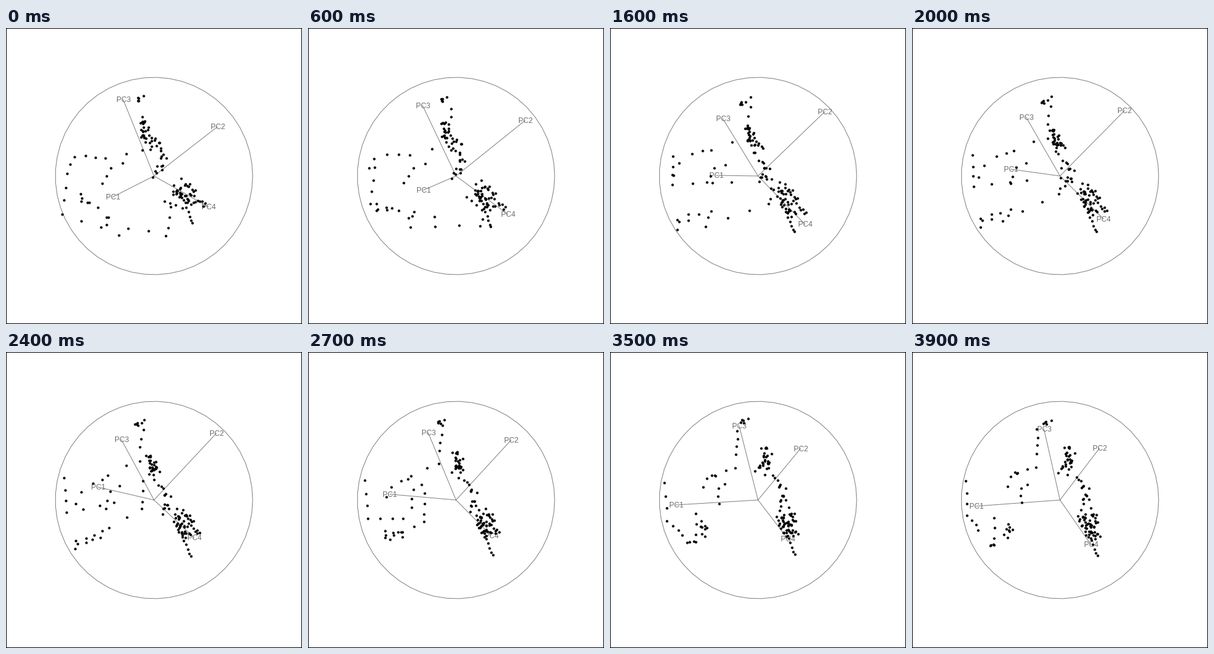
These frames come from a looping animation (480x480 px, 4 s). A matplotlib script:

```python
import numpy as np
import matplotlib.pyplot as plt
from matplotlib.animation import FuncAnimation

SIZE, MID, RADIUS = 480, 240, 160
FRAMES, STEP = 40, 100
GREY, TEXT_GREY = "#7f7f7f", "#6c6c6c"
PX = 0.9  # points per pixel at 80 dpi

# Key poses of the tour: where PC1..PC4 point on screen
KEY_TIMES = [0, 600, 1000, 1600, 2400, 3100, 3900]
KEY_AXES = np.array([
    [[173, 274], [343, 160], [190, 116], [328, 290]],
    [[187, 263], [352, 150], [186, 126], [324, 302]],
    [[174, 272], [349, 150], [182, 140], [318, 320]],
    [[172, 239], [348, 136], [183, 147], [316, 318]],
    [[149, 219], [341, 132], [187, 142], [305, 301]],
    [[110, 246], [314, 157], [205, 115], [286, 293]],
    [[104, 250], [304, 156], [214, 125], [290, 312]],
], float) - MID
VIEWS = np.hstack([KEY_AXES[2], KEY_AXES[5]])

rng = np.random.default_rng(7)


def strand(count, spread, *keys):
    """Dots along a bent line in 4D, loosened by a spread in pixels.

    Each key is one point seen in two views: x, y at 1000 ms and at 3100 ms.
    """
    keys = (np.array(keys, float) - MID) @ np.linalg.inv(VIEWS)
    u = np.linspace(0, len(keys) - 1, count)
    path = np.column_stack([np.interp(u, range(len(keys)), k) for k in keys.T])
    return path + rng.normal(0, spread / RADIUS, path.shape)


left_arm = [
    strand(7, 1.5, (102, 226, 89, 215), (101, 268, 96, 282), (198, 289, 126, 303)),
    strand(6, 4, (99, 224, 145, 216), (135, 193, 166, 201), (195, 204, 186, 202)),
    strand(8, 6, (104, 311, 138, 276), (128, 301, 150, 284), (166, 308, 148, 296)),
    strand(7, 3, (159, 335, 125, 302), (260, 335, 143, 303), (267, 297, 145, 256)),
    strand(4, 3, (157, 249, 174, 250), (181, 222, 179, 207)),
]
top_arm = [
    strand(5, 4, (212, 122, 214, 103), (218, 128, 218, 114)),
    strand(5, 2, (229, 127, 211, 130), (222, 190, 204, 184)),
    strand(28, 5, (222, 150, 250, 152), (227, 172, 256, 182), (243, 195, 242, 185)),
    strand(14, 4, (243, 201, 264, 195), (254, 222, 280, 228), (238, 235, 272, 252)),
]
right_arm = [
    strand(30, 5, (277, 254, 278, 268), (284, 275, 286, 276), (298, 298, 289, 290)),
    strand(16, 3, (289, 247, 295, 252), (303, 275, 297, 274), (318, 298, 301, 292)),
    strand(9, 2, (266, 258, 277, 287), (290, 302, 288, 300), (302, 324, 301, 328)),
]
data = np.vstack(left_arm + top_arm + right_arm)


def basis(ms):
    flat = KEY_AXES.reshape(len(KEY_TIMES), -1)
    return np.array([np.interp(ms, KEY_TIMES, col) for col in flat.T]).reshape(4, 2)


fig = plt.figure(figsize=(6, 6), dpi=80, facecolor="white")
ax = fig.add_axes([0, 0, 1, 1])
ax.set(xlim=(0, SIZE), ylim=(SIZE, 0))
ax.axis("off")

# Only the inner half of the 2 px frame is on the stage
ax.add_patch(plt.Rectangle((0, 0), SIZE, SIZE, fill=False, ec="black",
                           lw=2 * PX, snap=False))
angle = np.linspace(0, 2 * np.pi, 50)[:-1]
rim = MID + RADIUS * np.column_stack([np.cos(angle), -np.sin(angle)])
ax.add_patch(plt.Polygon(rim, fill=False, ec=GREY, lw=PX))
spokes = [ax.plot([], [], color=GREY, lw=PX)[0] for _ in range(4)]
labels = [ax.text(0, 0, f"PC{i + 1}", color=TEXT_GREY, fontsize=12 * PX,
                  family="Liberation Sans", ha="center", va="baseline")
          for i in range(4)]
dots, = ax.plot([], [], "o", color="black", ms=4.2 * PX, mew=0, zorder=5)


def draw(i):
    axes = basis(i * STEP)
    for (x, y), spoke, label in zip(axes + MID, spokes, labels):
        spoke.set_data([MID, x], [MID, y])
        label.set_position((x + 0.6, y + 4.3))
    dots.set_data(*(data @ axes + MID).T)
    return [*spokes, *labels, dots]


anim = FuncAnimation(fig, draw, frames=FRAMES, interval=STEP,
                     repeat=True, repeat_delay=0)
plt.show()
```
